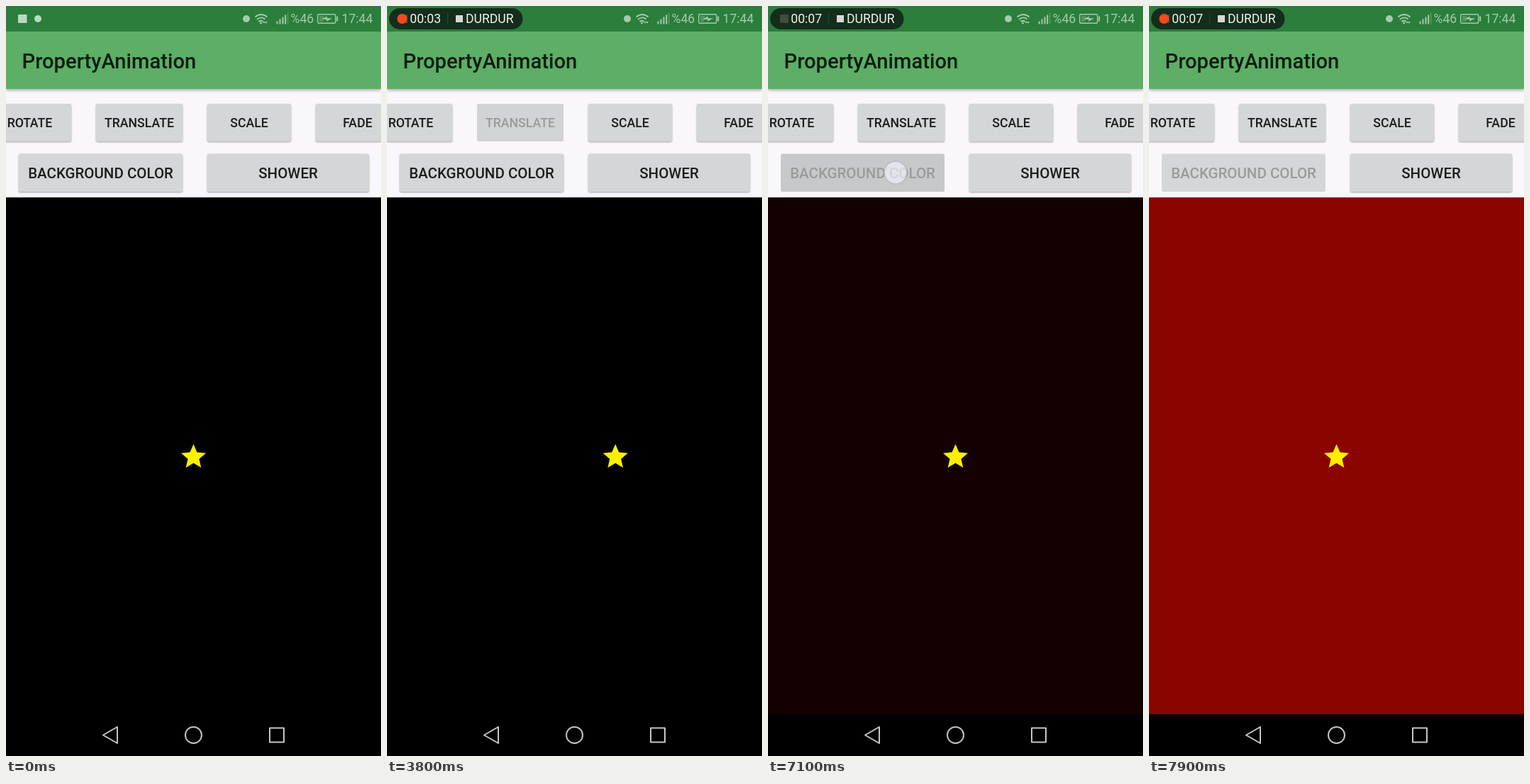
Write an HTML page that moves like this. It is 529 px wide and 1058 px high and loops after 8000 ms.

```html
<!DOCTYPE html>
<html lang="en">
<head>
<meta charset="utf-8">
<title>PropertyAnimation</title>
<style>
  html, body { margin: 0; width: 100%; height: 100%; overflow: hidden; background: #000; }
  svg { display: block; width: 529px; height: 1058px; font-family: Roboto, sans-serif; }
  .status { font-size: 17.6px; }
  .title { font-size: 29.2px; font-weight: 500; fill: #0b1c0e; }
  .bar { filter: drop-shadow(0 2px 2px rgba(0, 0, 0, .32)); }
  .btn text { font-weight: 500; text-anchor: middle; fill: #1c1d1d; }
  .btn .face { fill: #d5d6d7; filter: drop-shadow(0 1px 1.3px rgba(0, 0, 0, .36)); }
  .btn.off text { fill: #9a9b9b; }
  .btn.off .face { filter: none; }
  .nav { fill: none; stroke: #c6c6c6; stroke-width: 2; stroke-linejoin: round; }
</style>
</head>
<body>
<svg viewBox="0 0 529 1058">
  <rect width="529" height="1058"/>
  <rect y="36" width="529" height="234" fill="#f9f7fb"/>
  <rect class="bar" y="30" width="529" height="87" fill="#5dae66"/>
  <rect width="529" height="36" fill="#2b7e3b"/>
  <text class="title" x="22.5" y="87.5">PropertyAnimation</text>
  <g id="buttons"></g>
  <rect id="field" y="270" width="529" height="729"/>
  <path id="star" fill="#fff000" d="M12 17.27L18.18 21l-1.64-7.03L22 9.24l-7.19-.61L12 2 9.19 8.63 2 9.24l5.46 4.73L5.82 21z"/>

  <g id="idle" fill="#b9dabd">
    <rect x="17" y="12" width="12.5" height="12" rx="1"/>
    <circle cx="45" cy="18" r="5"/>
  </g>
  <g id="pill">
    <rect x="3" y="3" width="188.5" height="30" rx="15" fill="#152d1b"/>
    <rect x="17" y="12" width="12" height="12" rx="1" fill="#414b43"/>
    <circle id="dot" cx="21.3" cy="18" r="7" fill="#ff461c"/>
    <text id="clock" class="status" x="32.3" y="24.3" fill="#eef2ee"></text>
    <path d="M85.5 10v15" stroke="#2c4231"/>
    <rect x="97" y="13" width="10" height="10" fill="#d5d9d5"/>
    <text class="status" x="111" y="24.3" fill="#eef2ee">DURDUR</text>
  </g>

  <g fill="#a5cbab">
    <circle cx="339" cy="18" r="5"/>
    <g fill="none" stroke="#a5cbab" stroke-width="1.8">
      <path d="M351.500 15.500q8.500-7 17 0M354 19q6-5 11.500-.5M356.500 22q3-2.500 6 0"/>
    </g>
    <circle cx="359.500" cy="24" r="1.500"/>
    <path d="M364 21l1.700 3h-3.400zM367 25l-1.700-3h3.400z"/>
    <path d="M381.500 21.500h2v4h-2zM385.500 18.500h2v7h-2zM389.500 15.500h2v10h-2zM393.200 12.500h2v13h-2z"/>
    <path d="M396.800 9.500h1.600v16h-1.600z" opacity=".35"/>
    <text class="status" x="401.500" y="24.300">%46</text>
    <rect x="439.700" y="11.700" width="25" height="12.600" rx="1.500" fill="none" stroke="#a5cbab" stroke-width="1.400"/>
    <path d="M466.200 14.500h2v7h-2z"/>
    <path d="M442 14h7l-2 8h-5z" opacity=".3"/>
    <path d="M445 18.500l8-4-.5 2.700 7.500.3-8 4.200.5-2.700z"/>
    <text class="status" x="473.500" y="24.300">17:44</text>
  </g>

  <g class="nav">
    <path d="M137 1028.500L157 1017v23z"/>
    <circle cx="264.500" cy="1028.500" r="11.500"/>
    <rect x="372" y="1018.500" width="20" height="20"/>
  </g>
  <circle id="touch" r="16" fill="#f4f4fb" fill-opacity=".62" stroke="#a6acc6" stroke-opacity=".65" stroke-width="1.500"/>
</svg>
<script>
const LOOP = 8000, STEP = 100;
const $ = id => document.getElementById(id);
const [buttonBox, field, star, idle, pill, dot, clock, touch] =
  ['buttons', 'field', 'star', 'idle', 'pill', 'dot', 'clock', 'touch'].map($);

const ease = x => (1 - Math.cos(Math.PI * x)) / 2;
const clamp = x => Math.min(1, Math.max(0, x));
const pingPong = x => x <= 0 || x >= 2 ? 0 : ease(x < 1 ? x : 2 - x);

function addButton(label, x, y, w, h, size) {
  const rect = `x="${x}" y="${y}" width="${w}" height="${h}" rx="2.5"`;
  buttonBox.insertAdjacentHTML('beforeend', `<g class="btn">
    <rect class="face" ${rect}/><rect class="ripple" ${rect} opacity="0"/>
    <text x="${x + w / 2}" y="${y + h / 2 + size * 0.355}" font-size="${size}">${label}</text></g>`);
  return buttonBox.lastElementChild;
}

const buttons = {
  rotate: addButton('ROTATE', -25, 138, 117, 53, 17.7),
  translate: addButton('TRANSLATE', 127, 138, 122, 53, 17.7),
  scale: addButton('SCALE', 284, 138, 118, 53, 17.7),
  fade: addButton('FADE', 437, 138, 118, 53, 17.7),
  color: addButton('BACKGROUND COLOR', 18, 208.5, 231, 53.5, 20.5),
  shower: addButton('SHOWER', 284, 208.5, 228, 53.5, 20.5)
};

// Each tap: finger down, animation start and end, finger position.
const taps = [
  { name: 'rotate', down: 350, start: 450, end: 1450, x: 40, y: 165 },
  { name: 'rotate', down: 2100, start: 2180, end: 3180, x: 40, y: 165 },
  { name: 'translate', down: 3270, start: 3367, end: 3967, x: 190, y: 165 },
  { name: 'scale', down: 4300, start: 4420, end: 5020, x: 345, y: 165 },
  { name: 'fade', down: 5400, start: 5520, end: 6120, x: 495, y: 165 },
  { name: 'color', down: 7000, start: 7080, end: 8080, x: 180, y: 235 }
];

// Uneven pace of the colour sweep: [time, progress].
const pace = [[7080, 0], [7100, 0.037], [7300, 0.606], [7900, 1.657], [8080, 2]];

function colorProgress(t) {
  const i = pace.findIndex(p => t < p[0]);
  if (i < 1) return 0;
  const [t0, v0] = pace[i - 1], [t1, v1] = pace[i];
  return v0 + (v1 - v0) * (t - t0) / (t1 - t0);
}

function render(t) {
  const value = { rotate: 0, translate: 0, scale: 0, fade: 0 };
  for (const b of Object.values(buttons)) {
    b.classList.remove('off');
    b.querySelector('.ripple').setAttribute('opacity', 0);
  }
  touch.style.display = 'none';

  for (const tap of taps) {
    const { name, down, start, end } = tap;
    if (t < down) continue;
    const button = buttons[name];
    const ripple = 0.065 * clamp((down + 600 - t) / 300);
    if (ripple) button.querySelector('.ripple').setAttribute('opacity', ripple);
    if (t < start + 60) {
      touch.style.display = '';
      touch.setAttribute('cx', tap.x);
      touch.setAttribute('cy', tap.y);
    }
    if (t < start || t >= end) continue;
    button.classList.add('off');
    const p = (t - start) / (end - start);
    value[name] = name === 'rotate' ? 360 * (ease(p) - 1) : pingPong(2 * p);
  }

  star.setAttribute('transform',
    `translate(${264.5 + 98 * value.translate} 635.5) rotate(${value.rotate}) ` +
    `scale(${1.75 * (1 + 3 * value.scale)}) translate(-12 -12)`);
  star.setAttribute('opacity', 1 - value.fade);

  const red = Math.pow(pingPong(colorProgress(t)), 1 / 2.2);
  field.setAttribute('fill', `rgb(${Math.round(255 * red)},${Math.round(8 * red)},0)`);

  const recording = t >= 100;
  idle.style.display = recording ? 'none' : '';
  pill.style.display = recording ? '' : 'none';
  const secs = Math.max(0, t - 50) / 1000;
  clock.textContent = '00:0' + Math.floor(secs);
  dot.style.display = secs % 1 >= 0.54 ? '' : 'none';
}

function tick() {
  const t = performance.now() % LOOP;
  render(Math.floor(t / STEP) * STEP);
  requestAnimationFrame(tick);
}
tick();
</script>
</body>
</html>
```
